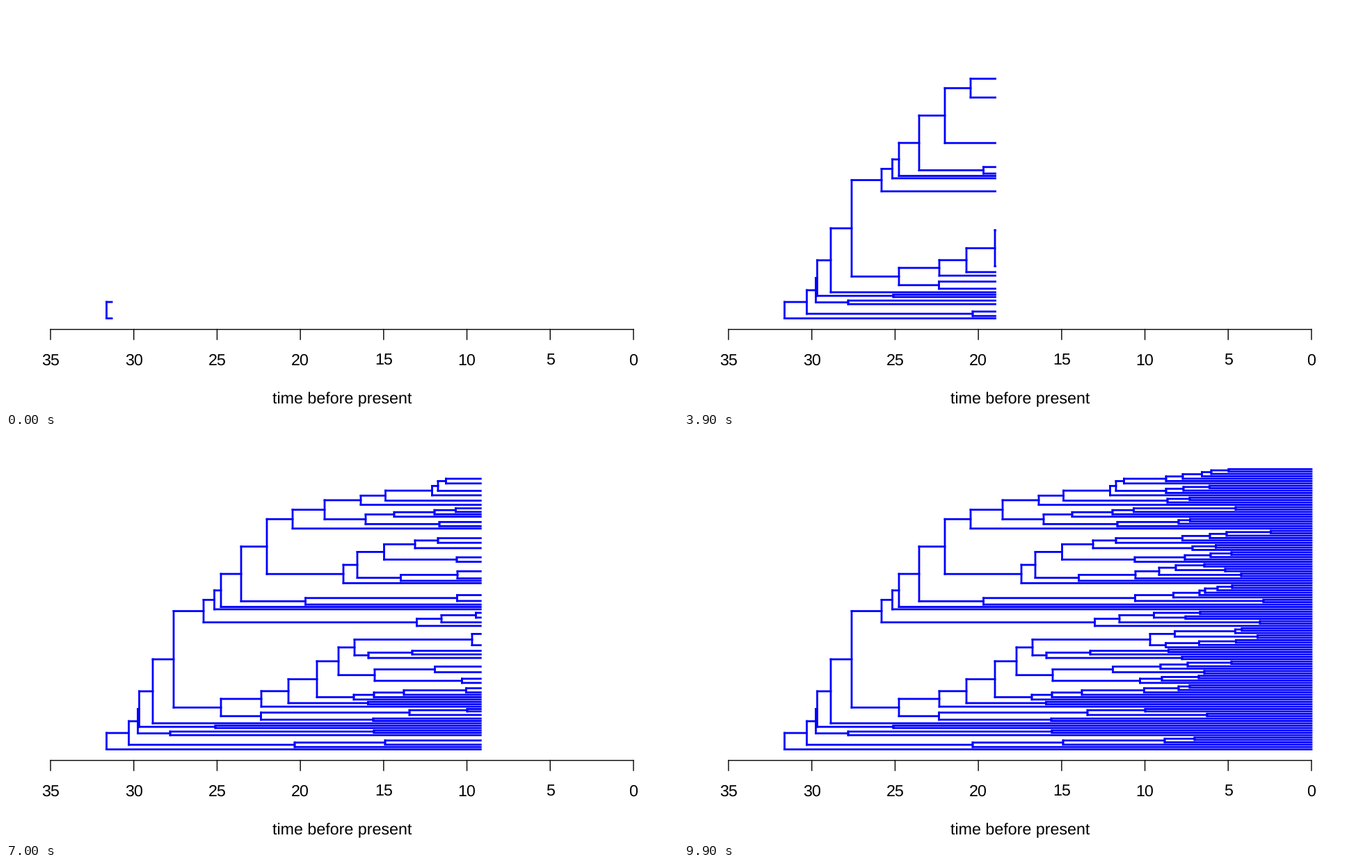
Write a matplotlib script that moves like this. It is 966 by 580 pixels and loops after 10 s.

```python
import matplotlib.pyplot as plt
from matplotlib.animation import FuncAnimation
from matplotlib.collections import LineCollection

W, H, DPI = 966, 580, 100
FRAMES, INTERVAL = 100, 100
LEFT, RIGHT = 64, 902            # axis ends: 35 and 0 time units ago
BOTTOM, TOP = 449.6, 46.3        # first and last tip
PX = 72 / DPI

plt.rcParams["font.family"] = "Liberation Sans"
plt.rcParams["text.hinting"] = "none"


def clade(*xs, up=None, low=None):
    """Ladder of splits at xs, each shedding a lower tip; the last holds up and low."""
    node = (xs[-1], up, low)
    for x in reversed(xs[:-1]):
        node = (x, node, None)
    return node


# Lower part of the tree
base = clade(415, 545, 691, 734)
twigs = clade(236, 529)
fork = clade(366.5, up=clade(580, up=clade(663), low=clade(752)), low=clade(528))
steps = clade(500, 529, 572, 661.5, 711, 727)
middle = clade(530,
               up=clade(616.5, up=clade(685, 724, 787), low=clade(748)),
               low=clade(655.5, 687, 740))
crest = clade(501,
              up=clade(670,
                       up=clade(705.5, up=clade(792.5, 802), low=clade(824.5)),
                       low=clade(692.5, 740.5, 793.5)),
              low=clade(521, up=clade(584, 696.5), low=clade(716)))
lower = clade(309,
              up=clade(367, 406,
                       up=clade(447, up=clade(478, up=crest, low=middle), low=steps),
                       low=clade(520.5)),
              low=fork)

# Upper part of the tree
side = clade(590.5, 626,
             up=clade(626, up=clade(675.5, up=clade(742), low=clade(721)), low=clade(828)))
side = clade(590.5, up=side[1][1])
shelf = clade(430.5, 648.5,
              up=clade(703.5, 741, 749, 767, 788), low=clade(833))
fan = clade(567.5, 649, 683,
            up=clade(707, up=clade(748), low=clade(778)), low=clade(801))
comb = clade(543.5,
             up=clade(588,
                      up=clade(621, 716.5, 756, 780, 843.5),
                      low=clade(731, 764.5)),
             low=clade(648, 720, 757, 787))
bough = clade(485, 505, up=comb, low=fan)
brush = clade(517,
              up=clade(558, 616, 646.5, 793),
              low=clade(623, 711, 727.5))
summit = clade(510, 545.5,
               up=clade(612.5, 621,
                        up=clade(632.5, 693, 717, 744.5, 758, 783),
                        low=clade(693, 718, 755.5)),
               low=clade(695, 727))
peak = clade(375, up=clade(412, 458, up=summit, low=brush), low=bough)
upper = clade(284, up=clade(299.5, 309, 338, up=peak, low=shelf), low=side)

trunk = clade(191.5, up=clade(211, 241, up=upper, low=lower), low=clade(301))
root = clade(144.5, 176.5, up=clade(189.5, up=trunk, low=twigs), low=base)


def count(node):
    return 1 if node is None else count(node[1]) + count(node[2])


STEP = (BOTTOM - TOP) / (count(root) - 1)
branches, splits = [], []


def place(node, first=0):
    """Lay out a subtree whose lowest tip has index first; return its y."""
    if node is None:
        return BOTTOM - STEP * first
    x, up, low = node
    y_low = place(low, first)
    y_up = place(up, first + count(low))
    for child, y in ((low, y_low), (up, y_up)):
        branches.append((x, child[0] if child else RIGHT, y))
    splits.append((x, y_low, y_up))
    return (y_low + y_up) / 2


place(root)

fig = plt.figure(figsize=(W / DPI, H / DPI), dpi=DPI, facecolor="white")
ax = fig.add_axes([0, 0, 1, 1])
ax.set_xlim(0, W)
ax.set_ylim(H, 0)
ax.axis("off")

ticks = [(t, RIGHT - t * (RIGHT - LEFT) / 35) for t in range(0, 36, 5)]
scale = [[(LEFT, 465.5), (RIGHT, 465.5)]]
scale += [[(x, 465.5), (x, 480)] for _, x in ticks]
ax.add_collection(LineCollection(scale, colors="black", linewidths=1.4 * PX,
                                 capstyle="projecting", snap=False))


def label(x, y, text):
    ax.text(x, y, text, size=23.2 * PX, ha="center", va="baseline", color="black")


for t, x in ticks:
    label(x, 516.5, str(t))
label(483, 572, "time before present")

tree = LineCollection([], colors="blue", linewidths=2.8 * PX,
                      capstyle="projecting", snap=False)
ax.add_collection(tree)


def update(i):
    now = root[0] + (RIGHT - root[0]) * (i + 1) / FRAMES
    segs = [[(a, y), (min(b, now), y)] for a, b, y in branches if a < now]
    segs += [[(x, y0), (x, y1)] for x, y0, y1 in splits if x < now]
    tree.set_segments(segs)
    return tree,


anim = FuncAnimation(fig, update, frames=FRAMES, interval=INTERVAL,
                     repeat=True, repeat_delay=0)
plt.show()
```
